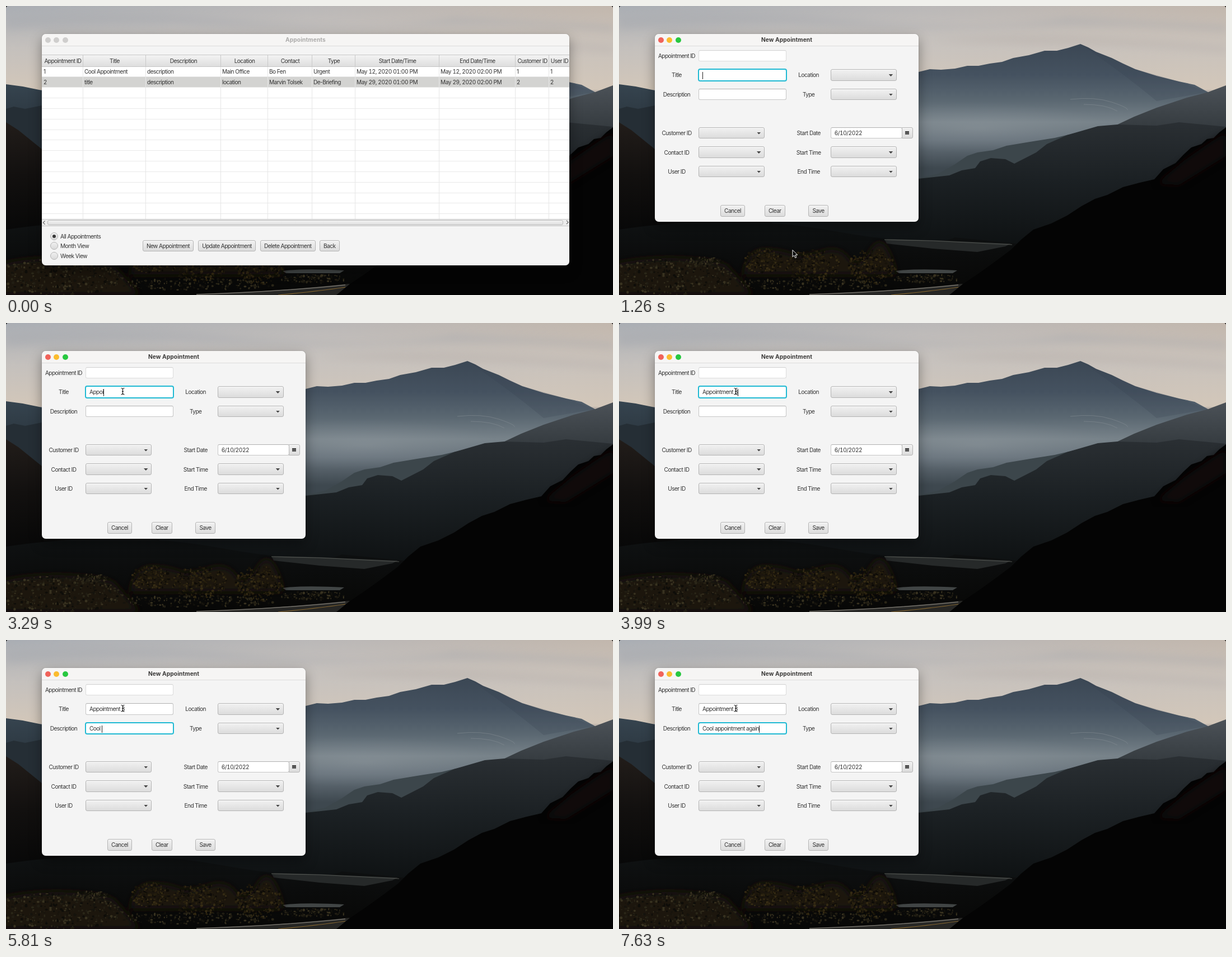
These frames come from a looping animation (1084 px wide and 517 px high, 8000 ms). An HTML page:

```html
<!DOCTYPE html>
<html lang="en">
<head>
<meta charset="utf-8">
<title>Appointments</title>
<style>
  html, body { margin: 0; width: 100%; height: 100%; overflow: hidden; background: #000; }
  #stage { position: relative; width: 1084px; height: 517px; overflow: hidden;
    font: 10.1px/20px Inter, "Open Sans", sans-serif; letter-spacing: -.55px; color: #333; }
  #stage > svg { position: absolute; left: 0; top: 0; }
  .win { position: absolute; inset: 0; }
  .win div, .win span { position: absolute; box-sizing: border-box; white-space: pre; }
  .win .frame { background: #f4f4f4; border-radius: 7px; overflow: hidden;
    box-shadow: 0 0 1px rgba(0,0,0,.6), 0 9px 22px rgba(0,0,0,.38); }
  .win .bar { left: 0; right: 0; top: 0; height: 22px; background: #f6f5f4; border-bottom: 1px solid #dcdbda; }
  .win .title { font-weight: 700; font-size: 10.2px; letter-spacing: .1px; color: #3b3a39; }
  .win .date { letter-spacing: -.4px; font-variant-numeric: tabular-nums; }
  .light { width: 10px; height: 10px; border-radius: 50%; }
  .idle .light { background: #cfcecd !important; }
  .idle .title { color: #acabaa; }
  .btn { border: 1px solid #b4b4b4; border-radius: 3px; background: linear-gradient(#f1f1f1, #dcdcdc);
    box-shadow: inset 0 1px #fafafa; text-align: center; line-height: 18px; }
  .btn.down { border-color: #169fc0; background: linear-gradient(#cfcfcf, #d8d8d8);
    box-shadow: 0 0 1px 1px #5cbcd3; }
  .field { border: 1px solid #c6c6c6; border-top-color: #b0b0b0; border-radius: 3px; background: #fff;
    padding-left: 6px; line-height: 18px; }
  .field.off { border-color: #dcdcdc; border-top-color: #d0d0d0; }
  .field.focus { border-color: #1fb9d3; box-shadow: 0 0 0 1px #1fb9d3; }
  .field i { display: inline-block; width: 1px; height: 13px; margin-right: -1px; background: #222;
    vertical-align: middle; visibility: hidden; }
  .field i.on { visibility: visible; }
  .arrow { background: #444; clip-path: polygon(0 0, 100% 0, 50% 100%); }
  .radio { width: 14px; height: 14px; border-radius: 50%; border: 1px solid #b5b5b5;
    background: linear-gradient(#f0f0f0, #dadada); }
  .radio.on::after { content: ""; position: absolute; left: 3px; top: 3px; width: 6px; height: 6px;
    border-radius: 50%; background: #383838; }
</style>
</head>
<body>
<div id="stage">
  <svg width="1084" height="517" viewBox="0 0 1084 517">
    <defs>
      <linearGradient id="sky" x1="0" y1="0" x2="1" y2="0">
        <stop offset="0" stop-color="#a9adb3"/><stop offset=".5" stop-color="#bab8b8"/><stop offset="1" stop-color="#c2b7ad"/>
      </linearGradient>
      <linearGradient id="glow" x1="0" y1="0" x2="0" y2="1">
        <stop offset="0" stop-color="#cfc8c0" stop-opacity="0"/><stop offset=".5" stop-color="#cbc5bf" stop-opacity=".8"/><stop offset="1" stop-color="#d3c7b9"/>
      </linearGradient>
      <linearGradient id="peak" gradientUnits="userSpaceOnUse" x1="0" y1="68" x2="0" y2="290">
        <stop offset="0" stop-color="#3b4754"/><stop offset=".25" stop-color="#455260"/>
        <stop offset=".45" stop-color="#5a6771"/><stop offset=".63" stop-color="#78838a"/>
        <stop offset=".78" stop-color="#66717a"/><stop offset="1" stop-color="#3e484f"/>
      </linearGradient>
      <linearGradient id="side" gradientUnits="userSpaceOnUse" x1="0" y1="140" x2="0" y2="235">
        <stop offset="0" stop-color="#4c5258"/><stop offset="1" stop-color="#30363a"/>
      </linearGradient>
      <linearGradient id="mid" gradientUnits="userSpaceOnUse" x1="0" y1="210" x2="0" y2="440">
        <stop offset="0" stop-color="#2a2f33"/><stop offset=".45" stop-color="#1b2023"/><stop offset="1" stop-color="#0d1011"/>
      </linearGradient>
      <linearGradient id="left" gradientUnits="userSpaceOnUse" x1="0" y1="140" x2="0" y2="260">
        <stop offset="0" stop-color="#36444f"/><stop offset="1" stop-color="#232c33"/>
      </linearGradient>
      <linearGradient id="slope" gradientUnits="userSpaceOnUse" x1="0" y1="205" x2="0" y2="400">
        <stop offset="0" stop-color="#221d1a"/><stop offset=".5" stop-color="#12100f"/><stop offset="1" stop-color="#080808"/>
      </linearGradient>
      <linearGradient id="floor" gradientUnits="userSpaceOnUse" x1="0" y1="375" x2="0" y2="517">
        <stop offset="0" stop-color="#101314"/><stop offset=".5" stop-color="#0b0c0c"/><stop offset="1" stop-color="#070706"/>
      </linearGradient>
      <radialGradient id="mist"><stop offset="0" stop-color="#a0a7ac" stop-opacity=".3"/><stop offset="1" stop-color="#98a0a6" stop-opacity="0"/></radialGradient>
      <filter id="soft"><feGaussianBlur stdDeviation="7"/></filter>
    </defs>
    <rect width="1084" height="517" fill="url(#sky)"/>
    <rect width="1084" height="150" fill="url(#glow)"/>
    <g filter="url(#soft)" opacity=".3">
      <path d="M0 20Q200 5 430 26T800 20L1084 34V46Q900 30 700 38T300 34L0 42Z" fill="#9fa3aa"/>
      <path d="M560 62Q700 48 830 55T1084 72V84Q900 68 740 70Z" fill="#b2aaa6"/>
    </g>
    <path d="M0 140L30 144L64 151L200 190V320H0Z" fill="url(#left)"/>
    <path d="M0 184L14 180L34 184L64 178L140 170V330H0Z" fill="#252e35"/>
    <path d="M400 150L470 128L535 118L555 113L575 114L600 112L622 107L642 107L662 103L684 100L704 93L732 88L760 80L782 80L802 75L824 68L838 74L852 82L880 93L900 103L922 113L960 125L1000 135L1028 141L1052 154L1084 162V330H400Z" fill="url(#peak)"/>
    <path d="M824 68L852 82L880 93L922 113L1000 135L1052 154L960 170Q900 120 824 68Z" fill="#333f4c" opacity=".2"/>
    <ellipse cx="640" cy="218" rx="240" ry="45" fill="url(#mist)"/>
    <path d="M806 167Q850 162 880 172T908 186M830 176Q870 176 890 188" fill="none" stroke="#8a9297" opacity=".5"/>
    <path d="M1084 142L1052 154L1014 164L960 182L920 198L886 214L1084 240Z" fill="url(#side)"/>
    <path d="M535 308L570 300L600 283L622 268L640 262L668 258L692 250L740 242L778 236L820 226V330H535Z" fill="#3c464b"/>
    <path d="M0 330L535 309L590 303L612 294L636 290L645 278L664 272L690 274L706 282L745 262L764 247L800 231L855 215L890 212L960 214L1000 208L1084 216V450H0Z" fill="url(#mid)"/>
    <path d="M0 208L22 222L64 256L140 320L260 380L340 430V517H0Z" fill="url(#slope)"/>
    <path d="M0 400Q200 370 380 402T600 414L760 430V517H0Z" fill="url(#floor)"/>
    <path d="M474 417L560 419L700 425L690 430L640 440L560 434L478 425Z" fill="#262929"/>
    <path d="M474 418L560 420L702 427" fill="none" stroke="#50534f" stroke-width="1.2"/>
    <path d="M494 474Q530 469 604 473L596 478H500Z" fill="#414545"/>
    <g filter="url(#soft)" fill="#1b170d">
      <path d="M-10 462Q90 440 190 462L240 517H-10Z"/>
      <path d="M222 480Q230 434 262 436T310 445T360 440T410 452T450 436T495 480Z"/>
    </g>
    <g id="brush"></g>
    <path d="M330 517Q480 511 612 497L620 500L590 517Z" fill="#272725"/>
    <path d="M340 516Q490 511 606 499" fill="none" stroke="#74716a" stroke-width="1.5"/>
    <path d="M486 517Q560 510 606 503" fill="none" stroke="#84652f" stroke-width="1.2"/>
    <path d="M1084 217L1072 226L1062 236L1050 238L1040 247L1022 253L1008 266L994 281L972 292L956 310L930 316L900 324L872 338L850 345L826 358L800 375L772 389L740 400L718 418L700 436L668 460L640 480L612 499L590 517H1084Z" fill="#040404"/>
    <path d="M1084 226L1050 248L1010 276L960 318L1000 320L1084 268Z" fill="#13100e" opacity=".7" filter="url(#soft)"/>
    <path d="M0 0H4Q0 0 0 4ZM1084 0H1080Q1084 0 1084 4Z"/>
  </svg>
  <div class="win" id="list"></div>
  <div class="win" id="form"></div>
  <svg width="1084" height="517" viewBox="0 0 1084 517">
    <path id="pointer" d="M0 0V12.2L2.8 9.6L4.7 14L6.8 13.1L4.9 8.8H8.7Z" fill="#000" stroke="#fff" stroke-width="1"/>
    <g id="beam" fill="none">
      <path id="beamLine" d="M205.5 116.5Q208 116.5 208.5 118V126Q208 128 205.5 128M211.5 116.5Q209 116.5 208.5 118M208.5 126Q209 128 211.5 128M207 122.5H210" stroke="#fff" stroke-width="2.4" opacity=".8"/>
      <use href="#beamLine" style="display:none"/>
      <path d="M205.5 116.5Q208 116.5 208.5 118V126Q208 128 205.5 128M211.5 116.5Q209 116.5 208.5 118M208.5 126Q209 128 211.5 128M207 122.5H210" stroke="#111" stroke-width="1.1"/>
    </g>
  </svg>
</div>
<script>
const $ = id => document.getElementById(id);
const list = $('list'), form = $('form');

function box(parent, cls, x, y, w, h, css = '') {
  const el = document.createElement('div');
  el.className = cls;
  el.style.cssText = `left:${x}px;top:${y}px;width:${w}px;height:${h}px;${css}`;
  parent.append(el);
  return el;
}
function label(parent, x, cy, text, centered, cls = '') {
  const el = document.createElement('span');
  el.className = cls;
  el.textContent = text;
  el.style.cssText = `top:${cy - 10}px;` +
    (centered ? `left:${x - 100}px;width:200px;text-align:center` : `left:${x}px`);
  parent.append(el);
}
function frame(win, w, h, title) {
  box(win, 'frame', 64, 50, w, h).innerHTML = '<div class="bar"></div>';
  ['#f0635a', '#fbbc2e', '#28c840'].forEach((c, i) =>
    box(win, 'light', 69.5 + i * 15.8, 55.5, 10, 10, `background:${c}`));
  label(win, 64 + w / 2, 60, title, true, 'title');
}
function button(win, x, y, w, text) {
  const el = box(win, 'btn', x, y, w, 20.5);
  el.textContent = text;
  return el;
}

// Appointment list
frame(list, 942, 414, 'Appointments');
const edges = [64, 137, 249, 383, 467, 546, 623, 773, 909, 969, 1006];
const heads = ['Appointment ID', 'Title', 'Description', 'Location', 'Contact', 'Type',
  'Start Date/Time', 'End Date/Time', 'Customer ID', 'User ID'];
const rows = [
  ['1', 'Cool Appointment', 'description', 'Main Office', 'Bo Fen', 'Urgent',
    'May 12, 2020 01:00 PM', 'May 12, 2020 02:00 PM', '1', '1'],
  ['2', 'title', 'description', 'location', 'Marvin Tolsek', 'De-Briefing',
    'May 29, 2020 01:00 PM', 'May 29, 2020 02:00 PM', '2', '2']];
const rowH = 18.85;
box(list, '', 64, 87, 942, 307, 'background:#fff;border-top:1px solid #c8c8c8;border-bottom:1px solid #c8c8c8');
box(list, '', 64, 88, 942, 20.5, 'background:linear-gradient(#f3f3f3,#dedede);border-bottom:1px solid #c6c6c6');
box(list, '', 64, 127, 942, 18.7, 'background:#d3d3d1');
for (let i = 1; i < 15; i++) box(list, '', 64, Math.round(107.4 + i * rowH), 942, 1, 'background:#e9e9e9');
edges.slice(1, -1).forEach(x => {
  box(list, '', x, 88, 1, 20, 'background:#c9c9c9');
  box(list, '', x, 109, 1, 272, 'background:#e6e6e6');
});
heads.forEach((h, i) => label(list, (edges[i] + edges[i + 1]) / 2 + 1, 98, h, true));
rows.forEach((r, j) => r.forEach((s, i) =>
  label(list, edges[i] + 3, 117.2 + j * rowH, s, false, s.startsWith('May') ? 'date' : '')));

box(list, '', 64, 381, 942, 12.5, 'background:#ececec;border-top:1px solid #c8c8c8;border-bottom:1px solid #c8c8c8');
box(list, '', 74, 383, 921, 9, 'background:linear-gradient(#f3f3f3,#dedede);border:1px solid #bbb;border-radius:3px');
[[66.5, 45], [998.5, 225]].forEach(([x, a]) =>
  box(list, '', x, 385, 4.5, 4.5, `border:solid #555;border-width:0 0 1px 1px;transform:rotate(${a}deg)`));

['All Appointments', 'Month View', 'Week View'].forEach((s, i) => {
  const y = 411.5 + i * 17.7;
  box(list, i ? 'radio' : 'radio on', 79, y - 7, 14, 14);
  label(list, 97, y, s);
});
const newBtn = button(list, 244, 418.8, 91, 'New Appointment');
button(list, 343, 418.8, 103, 'Update Appointment');
button(list, 454, 418.8, 98.5, 'Delete Appointment');
button(list, 560, 418.8, 35.5, 'Back');

// New appointment form
frame(form, 471, 336, 'New Appointment');
const ys = [89, 123.4, 158, 0, 227, 261.6, 296];
['Appointment ID', 'Title', 'Description', '', 'Customer ID', 'Contact ID', 'User ID']
  .forEach((s, i) => label(form, 103, ys[i], s, true));
['', 'Location', 'Type', '', 'Start Date', 'Start Time', 'End Time']
  .forEach((s, i) => label(form, 338.7, ys[i], s, true));
function combo(x, cy) {
  box(form, 'btn', x, cy - 10.2, 118, 20.4);
  box(form, 'arrow', x + 104, cy - 1.5, 7.5, 4);
}
[4, 5, 6].forEach(i => combo(142, ys[i]));
[1, 2, 5, 6].forEach(i => combo(377.7, ys[i]));
const field = (x, cy, w, cls = '') => box(form, 'field ' + cls, x, cy - 10.2, w, 20.4);
field(142, ys[0], 157, 'off');
field(377.7, ys[4], 128, 'date').textContent = '6/10/2022';
box(form, 'btn', 504.5, ys[4] - 10.2, 20.5, 20.4, 'border-radius:0 3px 3px 0');
box(form, '', 511, 224, 7, 6, 'background:#5a5a5a;border-top:1px solid #2c2c2c');
button(form, 181, 356, 44, 'Cancel');
button(form, 260, 356, 36.5, 'Clear');
button(form, 338, 356, 36, 'Save');

// One key time per character
function typed(y, text, keys) {
  const el = field(142, y, 157);
  const words = document.createTextNode('');
  const caret = document.createElement('i');
  el.append(words, caret);
  return (t, focus, blink) => {
    el.classList.toggle('focus', focus);
    caret.className = focus && blink ? 'on' : '';
    words.data = text.slice(0, keys.filter(k => k <= t).length);
  };
}
const drawTitle = typed(ys[1], 'Appointment 3',
  [2660, 2800, 2940, 3080, 3290, 3360, 3430, 3500, 3570, 3640, 3710, 3850, 3990]);
const drawDescription = typed(ys[2], 'Cool appointment again',
  [5040, 5250, 5390, 5530, 5740, 5880, 6020, 6160, 6300, 6440, 6510, 6580,
    6720, 6720, 6790, 6930, 7070, 7210, 7350, 7490, 7630, 7630]);

// Roadside scrub
let seed = 7;
const rnd = () => (seed = seed * 16807 % 2147483647) / 2147483647;
function scrub(n, cx, cy, rx, ry, colors) {
  let out = '';
  for (let i = 0; i < n; i++) {
    const a = rnd() * 6.283, r = Math.sqrt(rnd());
    const x = cx + Math.cos(a) * r * rx, y = cy + Math.sin(a) * r * ry;
    out += `<ellipse cx="${x.toFixed(1)}" cy="${y.toFixed(1)}" rx="${(.7 + rnd() * 2).toFixed(1)}" ry="${(.6 + rnd() * 2).toFixed(1)}" fill="${colors[i % colors.length]}"/>`;
  }
  return out;
}
const bush = ['#2a220f', '#17130a', '#352b14', '#0d0b07', '#221c0d'];
const grass = ['#2a2618', '#15130d', '#383220', '#0e0d09', '#211d13'];
$('brush').innerHTML = scrub(420, 90, 486, 120, 34, grass) + scrub(90, 155, 456, 30, 7, grass) +
  scrub(200, 258, 456, 34, 22, bush) + scrub(260, 345, 464, 50, 28, bush) +
  scrub(280, 452, 466, 42, 32, bush) + scrub(200, 330, 498, 150, 10, grass) +
  scrub(110, 550, 488, 60, 8, grass);

const between = (t, a, b) => t >= a && t < b;

function render(t) {
  const open = t >= 1260;
  list.style.display = open ? 'none' : '';
  form.style.display = open ? '' : 'none';
  list.classList.toggle('idle', t < 980);
  newBtn.classList.toggle('down', t >= 980);

  drawTitle(t, t < 4270, !between(t, 1750, 2240));
  drawDescription(t, t >= 4270, !between(t, 4830, 5040));

  // The pointer glides in 70 ms ticks from the button to the title field
  const step = Math.max(0, Math.min(4, Math.floor((t - 1470) / 70)));
  const p = step / 4, e = p * p * (3 - 2 * p);
  $('pointer').setAttribute('transform', `translate(${310 - 102 * e} ${436.5 - 314 * e})`);
  $('pointer').style.display = between(t, 1260, 1750) ? '' : 'none';
  $('beam').style.display = t >= 1750 ? '' : 'none';
}

const start = performance.now();
function tick(now) {
  render(Math.max(0, now - start) % 8000);
  requestAnimationFrame(tick);
}
render(0);
requestAnimationFrame(tick);
</script>
</body>
</html>
```
